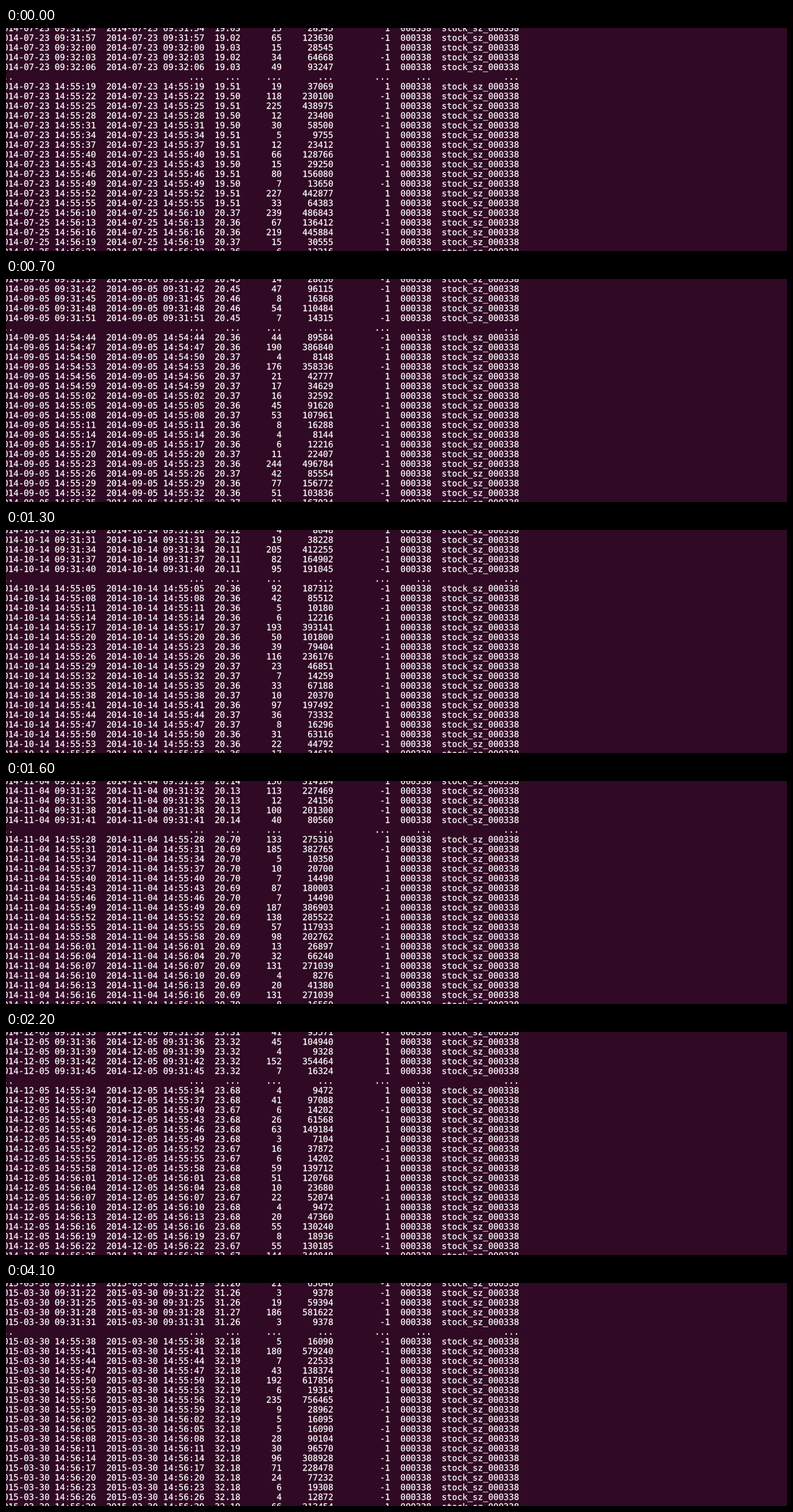
An HTML page that plays this animation: 1280 px wide and 367 px high, repeating every 4200 ms.

```html
<!DOCTYPE html>
<html lang="en">
<head>
<meta charset="utf-8">
<title>Stock ticks</title>
<style>
html, body { margin: 0; width: 100%; height: 100%; overflow: hidden; background: #300a24; }
svg { display: block; width: 1280px; height: 367px; }
text {
  font: 14.06px "DejaVu Sans Mono", monospace;
  fill: #fff;
  stroke: #fff;
  stroke-width: 0.25px;
  white-space: pre;
  text-rendering: geometricPrecision;
}
</style>
</head>
<body>
<svg id="terminal" viewBox="0 0 1280 367"></svg>
<script>
const LOOP = 4200, STEP = 100, LAST_STEP = 24, LATE_START = 4100;
const HEAD_ROWS = 5, TAIL_ROWS = 18, LINE_HEIGHT = 16, LEFT = -13.2, BASELINE = 5;
const DAY = 864e5, TICK = 3000;
const WIDTHS = [19, 21, 7, 8, 10, 11, 8, 17];

const run = (count, start, price) => ({ count, at: Date.parse(start.replace(" ", "T") + "Z"), price });
const head = (start, price) => run(HEAD_ROWS, start, price);
const tail = (start, price) => run(TAIL_ROWS, start, price);

// Key screens by step: runs of ticks, each with its first time and its price.
const keys = {
  0: [head("2014-07-23 09:31:54", 19.02), run(13, "2014-07-23 14:55:19", 19.50), run(5, "2014-07-25 14:56:10", 20.36)],
  4: [head("2014-08-18 09:31:59", 20.98), tail("2014-08-18 14:54:57", 21.01)],
  9: [head("2014-09-17 09:31:27", 20.09), tail("2014-09-17 14:54:36", 19.93)],
  16: [head("2014-11-04 09:31:29", 20.13), tail("2014-11-04 14:55:28", 20.69)],
  20: [head("2014-11-25 09:31:38", 21.36), tail("2014-11-25 14:55:33", 21.45)],
  24: [head("2014-12-15 09:31:28", 25.25), run(15, "2014-12-15 14:55:35", 25.89), run(3, "2014-12-18 09:31:00", 25.55)],
  25: [head("2015-03-30 09:31:19", 31.26), tail("2015-03-30 14:55:38", 32.18)]
};
const keySteps = Object.keys(keys).map(Number);

const lerp = (a, b, f) => a + (b - a) * f;

function seededRandom(seed) {
  return () => {
    seed = (seed * 1664525 + 1013904223) >>> 0;
    return seed / 2 ** 32;
  };
}

function tradingDay(time) {
  let day = Math.floor(time / DAY) * DAY;
  while (new Date(day).getUTCDay() % 6 === 0) day += DAY;
  return day;
}

function runsAt(step) {
  if (keys[step]) return keys[step];
  const next = keySteps.find(k => k > step);
  const prev = keySteps[keySteps.indexOf(next) - 1];
  const f = (step - prev) / (next - prev);
  const from = keys[prev], to = keys[next];
  const day = tradingDay(lerp(from[0].at, to[0].at, f));
  return [HEAD_ROWS, TAIL_ROWS].map((count, i) => ({
    count,
    at: day + lerp(from[i].at % DAY, to[i].at % DAY, f),
    price: lerp(from[i].price, to[i].price, f)
  }));
}

function formatRow(...cells) {
  return cells.map((cell, i) => String(cell).padStart(WIDTHS[i])).join("");
}

function formatTick(at, basePrice, random) {
  const stamp = new Date(at).toISOString().slice(0, 19).replace("T", " ");
  const side = random() < 0.5 ? 1 : -1;
  const cents = Math.round(basePrice * 100) + (side > 0 ? 1 : 0);
  const volume = Math.ceil(Math.exp(1 + random() * 4.5));
  return formatRow(stamp, stamp, (cents / 100).toFixed(2), volume, cents * volume, side,
    "000338", "stock_sz_000338");
}

const gapRow = formatRow("...".padEnd(WIDTHS[0]), ...WIDTHS.slice(1).map(() => "..."));

function makeScreen(step) {
  const random = seededRandom(step * 7919 + 1);
  const lines = runsAt(step).flatMap(({ count, at, price }) =>
    Array.from({ length: count }, (_, i) => formatTick(at + i * TICK, price, random)));
  lines.splice(HEAD_ROWS, 0, gapRow);
  return lines;
}

const screens = Array.from({ length: LAST_STEP + 2 }, (_, step) => makeScreen(step));

const rows = screens[0].map((_, i) => {
  const row = document.createElementNS("http://www.w3.org/2000/svg", "text");
  row.setAttribute("x", LEFT);
  row.setAttribute("y", BASELINE + i * LINE_HEIGHT);
  return document.getElementById("terminal").appendChild(row);
});

let shown = -1;
function draw() {
  const time = performance.now() % LOOP;
  const step = time >= LATE_START ? LAST_STEP + 1 : Math.min(LAST_STEP, Math.floor(time / STEP));
  if (step !== shown) {
    rows.forEach((row, i) => { row.textContent = screens[step][i]; });
    shown = step;
  }
  requestAnimationFrame(draw);
}
draw();
</script>
</body>
</html>
```
